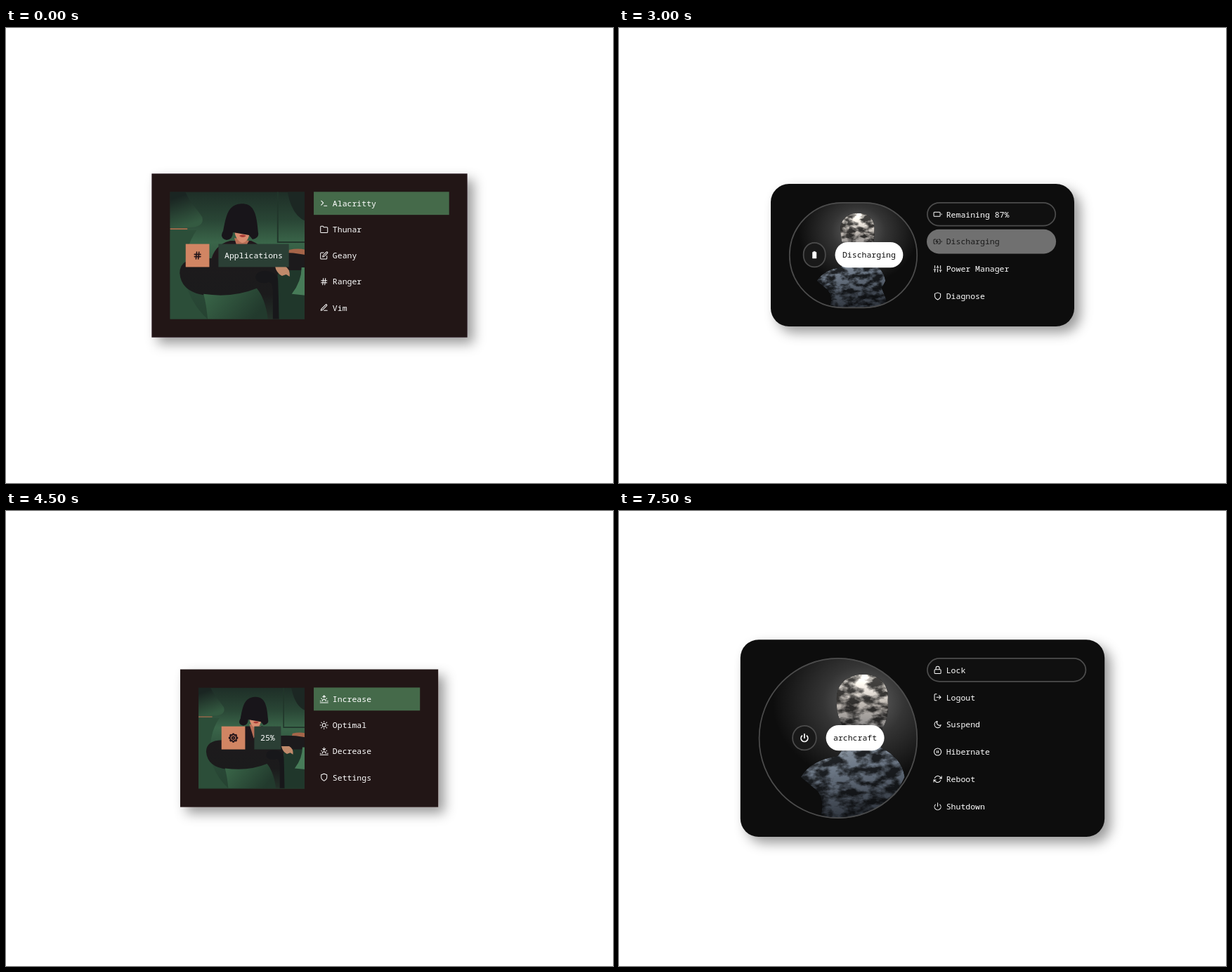
Recreate the animation shown at these times as an HTML page. Size 864x648 px, loop 8000 ms.

```html
<!DOCTYPE html>
<html lang="en">
<head>
<meta charset="utf-8">
<title>Applet menus</title>
<style>
  html, body { margin: 0; width: 100%; height: 100%; overflow: hidden; background: #fff; }
  svg { display: block; }
  #stage { width: 100vw; height: 100vh; }
  text { font: 13.333px "Noto Sans Mono", "DejaVu Sans Mono", monospace; white-space: pre; }
  .note { font-size: 11.667px; font-style: italic; }
  .icon { fill: none; stroke-width: 2; stroke-linecap: round; stroke-linejoin: round; }
</style>
</head>
<body>
<svg id="stage" viewBox="0 0 1000 750">
  <defs>
    <filter id="shadow" x="-20%" y="-30%" width="140%" height="160%">
      <feDropShadow dx="10" dy="10" stdDeviation="10" flood-color="#000" flood-opacity=".4"/>
    </filter>
    <filter id="soft2" x="-30%" y="-30%" width="160%" height="160%"><feGaussianBlur stdDeviation="1.6"/></filter>
    <filter id="soft8" x="-60%" y="-60%" width="220%" height="220%"><feGaussianBlur stdDeviation="8"/></filter>
    <filter id="stone" color-interpolation-filters="sRGB">
      <feTurbulence type="fractalNoise" baseFrequency=".05 .09" numOctaves="4" seed="4"/>
      <feColorMatrix values="0 0 0 3.4 -1.2  0 0 0 3.4 -1.2  0 0 0 3.4 -1.2  0 0 0 0 1"/>
      <feComposite in="SourceGraphic" operator="arithmetic" k1="1.2" k2=".4"/>
      <feComposite in2="SourceGraphic" operator="in"/>
    </filter>

    <linearGradient id="room" x2="0" y2="1">
      <stop offset="0" stop-color="#1e2e27"/><stop offset=".2" stop-color="#294535"/>
      <stop offset=".36" stop-color="#3a6549"/><stop offset=".6" stop-color="#2b4b39"/>
      <stop offset="1" stop-color="#24402f"/>
    </linearGradient>
    <linearGradient id="lamp" x2=".3" y2="1">
      <stop offset=".2" stop-color="#1a2522"/><stop offset="1" stop-color="#345a41"/>
    </linearGradient>
    <linearGradient id="chair" x2="0" y2="1">
      <stop offset="0" stop-color="#1d1a1c"/><stop offset=".6" stop-color="#1b1b1c"/>
      <stop offset="1" stop-color="#243129"/>
    </linearGradient>
    <linearGradient id="seat" x2="1" y2=".4">
      <stop offset="0" stop-color="#3b694a"/><stop offset="1" stop-color="#223a2d"/>
    </linearGradient>

    <linearGradient id="night" x2="0" y2="1">
      <stop offset="0" stop-color="#32256f"/><stop offset=".35" stop-color="#43248a"/>
      <stop offset=".6" stop-color="#4b2280"/><stop offset=".76" stop-color="#36195f"/>
      <stop offset="1" stop-color="#14082f"/>
    </linearGradient>
    <radialGradient id="violet"><stop stop-color="#7a34b0" stop-opacity=".75"/><stop offset="1" stop-color="#7a34b0" stop-opacity="0"/></radialGradient>
    <radialGradient id="blue"><stop stop-color="#5c6cff"/><stop offset=".45" stop-color="#4b50d8" stop-opacity=".75"/><stop offset="1" stop-color="#4b40b0" stop-opacity="0"/></radialGradient>
    <linearGradient id="wall"><stop stop-color="#7c2a80"/><stop offset=".75" stop-color="#d63f86"/><stop offset="1" stop-color="#8c2e90"/></linearGradient>
    <linearGradient id="floor" x2="0" y2="1"><stop stop-color="#451e70"/><stop offset=".35" stop-color="#2a1252"/><stop offset="1" stop-color="#12072e"/></linearGradient>

    <radialGradient id="halo"><stop stop-color="#6a6a6a"/><stop offset=".45" stop-color="#343434"/><stop offset="1" stop-color="#0d0d0d"/></radialGradient>
    <linearGradient id="skull" x2="0" y2="1"><stop stop-color="#b4b0aa"/><stop offset=".5" stop-color="#77736f"/><stop offset="1" stop-color="#4c4c4d"/></linearGradient>
    <linearGradient id="torso" x2=".2" y2="1"><stop stop-color="#6d7378"/><stop offset=".5" stop-color="#444b54"/><stop offset="1" stop-color="#20242a"/></linearGradient>

    <symbol id="lounge" viewBox="0 0 192 182" preserveAspectRatio="xMinYMin meet">
      <rect width="240" height="200" fill="url(#room)"/>
      <path d="M0 0H22C29 16 40 26 46 36Q50 50 28 51H0Z" fill="url(#lamp)"/>
      <path d="M0 53H25" stroke="#a96c4c" stroke-width="1.6"/>
      <path d="M168 0Q174 34 194 42V0Z" fill="#1c2723"/>
      <path d="M154 0V72H194" fill="none" stroke="#21362b" stroke-width="2"/>
      <path d="M0 55H38Q18 84 22 128Q30 160 54 182H0Z" fill="#2c4e39"/>
      <path d="M58 102Q62 76 86 70H116Q140 80 146 104Z" fill="#21171c"/>
      <path d="M92 66L100 92L113 70Z" fill="#b86f57"/>
      <path d="M92 56H114Q113 72 103 73Q94 70 92 56Z" fill="#d88d70"/>
      <path d="M99 63Q104 60 109 63Q104 67 99 63Z" fill="#a93c35"/>
      <path d="M102 17C122 16 124 36 126 58Q128 66 118 68L113 62L90 58Q90 68 81 69Q70 66 76 56C80 36 82 18 102 17Z" fill="#18151a"/>
      <path d="M170 83Q184 80 194 83V92H168Z" fill="#a56549"/>
      <path d="M110 94Q150 82 194 90V118H110Z" fill="#1c1a1c"/>
      <path d="M14 116Q14 96 42 95H136Q154 92 154 116V182H92Q70 150 52 148Q16 144 14 116Z" fill="url(#chair)"/>
      <path d="M48 146Q90 152 124 138Q136 152 140 182H54Q52 160 48 146Z" fill="url(#seat)"/>
      <path d="M122 122Q124 112 139 113Q155 115 156 132V182H147V140Q146 126 138 130Q124 132 122 122Z" fill="#17171a"/>
      <path d="M154 112H194V182H156Z" fill="#20372b"/>
      <path d="M174 146Q188 128 188 108H194V148Z" fill="#477b58"/>
      <path d="M150 106H164Q172 110 171 121L166 118L160 120Q152 116 150 106Z" fill="#c08a6b"/>
    </symbol>

    <symbol id="neon" viewBox="0 0 226.4 218.6" preserveAspectRatio="xMinYMin meet">
      <rect width="240" height="230" fill="url(#night)"/>
      <ellipse cx="78" cy="80" rx="88" ry="72" fill="url(#violet)"/>
      <circle cx="180" cy="74" r="66" fill="url(#blue)"/>
      <path d="M0 46L62 66V172H0Z" fill="#32165f" opacity=".75"/>
      <path d="M0 12L104 64M78 0L108 60L226 48M110 20L226 36M96 68L174 54L226 32" fill="none" stroke="#241752" stroke-width="1.3" opacity=".65"/>
      <path d="M62 118L80 124H188V166H62Z" fill="url(#wall)" opacity=".85"/>
      <ellipse cx="164" cy="142" rx="24" ry="20" fill="#ff4f8c" opacity=".6" filter="url(#soft8)"/>
      <path d="M63 120L83 124V166H63Z" fill="#a73a66"/>
      <path d="M76 122V168M88 124V166" stroke="#5f2460" stroke-width="2"/>
      <path d="M8 132H30V166H8Z" fill="#6d234f" opacity=".8"/>
      <path d="M14 128V170M24 128V170M36 112V170M48 108V170" stroke="#28103f" stroke-width="2"/>
      <g fill="none" stroke="#4a48b8" stroke-width="1.1">
        <ellipse cx="18" cy="84" rx="6" ry="18"/><ellipse cx="29" cy="87" rx="5" ry="15"/>
        <ellipse cx="37" cy="90" rx="4" ry="13"/><ellipse cx="44" cy="92" rx="3.5" ry="11"/>
        <path d="M0 56L12 78M0 100L62 118"/>
      </g>
      <rect y="166" width="240" height="60" fill="url(#floor)"/>
      <path d="M70 166H190L204 174H42Z" fill="#7b2b88" opacity=".45" filter="url(#soft2)"/>
      <circle cx="183" cy="65" r="23" fill="none" stroke="#ff45c8" stroke-width="8" opacity=".65" filter="url(#soft2)"/>
      <circle cx="183" cy="65" r="22.7" fill="none" stroke="#ffc3ee" stroke-width="3.4"/>
      <path d="M116 51H174V65H116Z" fill="#30256d" opacity=".88"/>
      <path d="M190 125Q195 126 194 132L199 136L198 154H196L195 172H191L190 158L188 172H184L183 152L181 150L182 135L187 132Q186 126 190 125Z" fill="#24104a"/>
    </symbol>

    <symbol id="statue" viewBox="0 0 226.4 229" preserveAspectRatio="xMinYMin meet">
      <rect width="300" height="240" fill="#0d0d0d"/>
      <ellipse cx="150" cy="62" rx="130" ry="115" fill="url(#halo)"/>
      <g filter="url(#stone)">
        <path d="M122 100H176L174 128Q204 142 208 170L200 186L218 229H88Q94 204 84 190L60 170Q74 146 112 140Q124 130 122 100Z" fill="url(#torso)"/>
        <path d="M147 24C168 22 186 34 184 60Q186 82 178 98Q164 110 148 110Q130 110 120 98Q110 82 111 60C110 36 128 24 147 24Z" fill="url(#skull)"/>
      </g>
    </symbol>
  </defs>
</svg>

<script>
const circle = (x, y, r) => `M${x - r} ${y}a${r} ${r} 0 1 0 ${2 * r} 0a${r} ${r} 0 1 0 ${-2 * r} 0z`;
const box = (x, y, w, h) => `M${x} ${y}h${w}v${h}h${-w}z`;

// Cog outline: each tooth has two outer and two inner corners.
function cog(teeth, inner, outer) {
  const points = Array.from({ length: teeth * 4 }, (_, i) => {
    const angle = (i - .5) / (teeth * 4) * 2 * Math.PI, r = i % 4 < 2 ? outer : inner;
    return `${(12 + r * Math.sin(angle)).toFixed(2)} ${(12 - r * Math.cos(angle)).toFixed(2)}`;
  });
  return `M${points.join('L')}z`;
}

const sunrise = 'M17 18a5 5 0 0 0-10 0M12 2v7M4.2 10.2l1.4 1.4M1 18h2M21 18h2M18.4 11.6l1.4-1.4M23 22H1';
const icons = {
  terminal: 'M4 17l6-6-6-6M12 19h8',
  folder: 'M22 19a2 2 0 0 1-2 2H4a2 2 0 0 1-2-2V5a2 2 0 0 1 2-2h5l2 3h9a2 2 0 0 1 2 2z',
  edit: 'M11 4H4a2 2 0 0 0-2 2v14a2 2 0 0 0 2 2h14a2 2 0 0 0 2-2v-7M18.5 2.5a2.12 2.12 0 0 1 3 3L12 15l-4 1 1-4z',
  hash: 'M4 9h16M4 15h16M10 3L8 21M16 3l-2 18',
  pen: 'M12 20h9M16.5 3.5a2.12 2.12 0 0 1 3 3L7 19l-4 1 1-4z',
  globe: circle(12, 12, 10) + 'M2 12h20M12 2a15.3 15.3 0 0 1 0 20a15.3 15.3 0 0 1 0-20z',
  music: 'M9 18V5l12-2v13' + circle(6, 18, 3) + circle(18, 16, 3),
  cog: cog(8, 8, 10.8) + circle(12, 12, 3),
  battery: 'M3 6h14a2 2 0 0 1 2 2v8a2 2 0 0 1-2 2H3a2 2 0 0 1-2-2V8a2 2 0 0 1 2-2zM23 13v-2',
  charging: 'M5 18H3a2 2 0 0 1-2-2V8a2 2 0 0 1 2-2h3.2M15 6h2a2 2 0 0 1 2 2v8a2 2 0 0 1-2 2h-3.2M23 13v-2M11 6l-4 6h6l-4 6',
  sliders: 'M4 21v-7M4 10V3M12 21v-9M12 8V3M20 21v-5M20 12V3M1 14h6M9 8h6M17 16h6',
  shield: 'M12 22s8-4 8-10V5l-8-3-8 3v7c0 6 8 10 8 10z',
  sunrise: sunrise + 'M8 6l4-4 4 4',
  sunset: sunrise + 'M16 5l-4 4-4-4',
  sun: circle(12, 12, 5) + 'M12 1v2M12 21v2M4.2 4.2l1.4 1.4M18.4 18.4l1.4 1.4M1 12h2M21 12h2M4.2 19.8l1.4-1.4M18.4 5.6l1.4-1.4',
  play: 'M5 3l14 9-14 9z',
  stop: box(3, 3, 18, 18),
  previous: 'M19 20L9 12l10-8zM5 19V5',
  next: 'M5 4l10 8-10 8zM19 5v14',
  repeat: 'M17 1l4 4-4 4M3 11V9a4 4 0 0 1 4-4h14M7 23l-4-4 4-4M21 13v2a4 4 0 0 1-4 4H3',
  shuffle: 'M16 3h5v5M4 20L21 3M21 16v5h-5M15 15l6 6M4 4l5 5',
  lock: 'M5 11h14a2 2 0 0 1 2 2v7a2 2 0 0 1-2 2H5a2 2 0 0 1-2-2v-7a2 2 0 0 1 2-2zM7 11V7a5 5 0 0 1 10 0v4',
  logout: 'M9 21H5a2 2 0 0 1-2-2V5a2 2 0 0 1 2-2h4M16 17l5-5-5-5M21 12H9',
  moon: 'M21 12.8A9 9 0 1 1 11.2 3 7 7 0 0 0 21 12.8z',
  pause: circle(12, 12, 10) + 'M10 15V9M14 15V9',
  refresh: 'M23 4v6h-6M1 20v-6h6M3.5 9a9 9 0 0 1 14.9-3.4L23 10M1 14l4.6 4.4A9 9 0 0 0 20.5 15',
  power: 'M18.4 6.6a9 9 0 1 1-12.8 0M12 2v10',
  grid: box(3, 4.5, 7.5, 5.5) + box(13.5, 4.5, 7.5, 5.5) + box(3, 14, 7.5, 5.5) + box(13.5, 14, 7.5, 5.5),
  cell: 'M10 3h4v2h3v16H7V5h3z',
  notes: circle(6, 18, 3) + circle(18, 16, 3) + 'M8 18V5l13-2v13h-2V9L10 11v7z',
};

const themes = {
  lounge: {
    back: '#231419', radius: 0, round: 0, rowHeight: 38, pad: 10, edge: null,
    button: '#d18563', buttonInk: '#231419', label: '#2b3f35', labelInk: '#fff',
    row: { select: ['#456a4a', '#fff'] },
  },
  neon: {
    back: '#0f0629', radius: 20, round: 15, rowHeight: 38, pad: 10, edge: null,
    button: '#8f3596', buttonInk: '#fff', label: '#6f78ff', labelInk: '#0f0629',
    row: { select: ['#e15595', '#0f0629'], active: ['#6f78ff', '#0f0629'], urgent: ['#8f3596', '#0f0629'] },
  },
  statue: {
    back: '#101010', radius: 30, round: 21, rowHeight: 40, pad: 12, edge: '#4c4c4c',
    button: '#191919', buttonInk: '#fff', label: '#fff', labelInk: '#101010',
    row: { select: ['#101010', '#fff', '#4c4c4c'], urgent: ['#707070', '#1a1a1a'] },
  },
};

// Row: icon, text, state, note
const scenes = [
  { art: 'lounge', left: 240, right: 760, top: 240, button: [296, 39, 'hash', 3], label: 'Applications', rows: [
    ['terminal', 'Alacritty', 'select'], ['folder', 'Thunar'], ['edit', 'Geany'], ['hash', 'Ranger'], ['pen', 'Vim']] },
  { art: 'neon', left: 200, right: 800, top: 218, button: [276, 38, 'grid'], label: 'Applications', rows: [
    ['terminal', 'Terminal', 'select', '(alacritty)'], ['folder', 'Files', '', '(thunar)'], ['edit', 'Editor', '', '(geany)'],
    ['globe', 'Browser', '', '(firefox)'], ['music', 'Music', '', '(alacritty -e ncmpcpp)'],
    ['cog', 'Settings', '', '(xfce4-settings-mana…']] },
  { art: 'statue', left: 250, right: 750, top: 257, button: [303, 38, 'cell'], label: 'Discharging', rows: [
    ['battery', 'Remaining 87%', 'select'], ['charging', 'Discharging', 'urgent'],
    ['sliders', 'Power Manager'], ['shield', 'Diagnose']] },
  { art: 'lounge', left: 287, right: 712, top: 261, button: [355, 39, 'cog', 3.4], label: '25%', rows: [
    ['sunrise', 'Increase', 'select'], ['sun', 'Optimal'], ['sunset', 'Decrease'], ['shield', 'Settings']] },
  { art: 'neon', left: 200, right: 800, top: 218, button: [244, 38, 'notes'], label: 'Marlowick Tensalbrook', rows: [
    ['play', 'Play', 'select'], ['stop', 'Stop'], ['previous', 'Previous'], ['next', 'Next'],
    ['repeat', 'Repeat', 'active'], ['shuffle', 'Random', 'urgent']] },
  { art: 'statue', left: 200, right: 800, top: 212, button: [285, 41, 'power', 3.2], label: 'archcraft', rows: [
    ['lock', 'Lock', 'select'], ['logout', 'Logout'], ['moon', 'Suspend'], ['pause', 'Hibernate'],
    ['refresh', 'Reboot'], ['power', 'Shutdown']] },
];

function panel(x, y, w, h, r, fill, edge, extra = '') {
  const inset = edge ? 1 : 0;
  return `<rect x="${x + inset}" y="${y + inset}" width="${w - 2 * inset}" height="${h - 2 * inset}"
    rx="${Math.min(r, w / 2, h / 2)}" fill="${fill}" ${edge ? `stroke="${edge}" stroke-width="2"` : ''} ${extra}/>`;
}

const icon = (name, x, y, size, color, weight) =>
  `<path class="icon" d="${icons[name]}" transform="translate(${x - size / 2} ${y - size / 2}) scale(${size / 24})"
    style="stroke:${color};${weight ? `stroke-width:${weight}` : `fill:${color};stroke-width:1`}"/>`;

const label = (x, y, color, text, note) =>
  `<text x="${x}" y="${y + 5}" fill="${color}">${text}${note ? ` <tspan class="note">${note}</tspan>` : ''}</text>`;

function drawScene(scene, id) {
  const { art, left, right, top, rows } = scene, theme = themes[art];
  const step = theme.rowHeight + 5, innerHeight = rows.length * step - 5;
  const imageX = left + 30, imageWidth = 492 - imageX, y0 = top + 30;
  const imageRadius = theme.edge ? 200 : theme.radius;

  const list = rows.map(([name, text, state, note], i) => {
    const y = y0 + i * step, middle = y + theme.rowHeight / 2;
    const [fill, ink, edge] = theme.row[state] || ['none', '#fff'];
    return panel(507, y, right - 30 - 507, theme.rowHeight, theme.round, fill, edge)
      + icon(name, theme.edge ? 525 : 524, middle, 14, ink, 2)
      + label(theme.edge ? 539 : 538, middle, ink, text, note);
  }).join('');

  const [buttonX, buttonWidth, buttonIcon, weight] = scene.button;
  const chipHeight = theme.edge ? 42 : 38, middle = Math.floor(top + 30 + innerHeight / 2);
  const chipY = middle - chipHeight / 2, labelX = buttonX + buttonWidth + 15;
  const labelWidth = scene.label.length * 8 + 2 * theme.pad;

  return `<g visibility="hidden">
    ${panel(left, top, right - left, innerHeight + 60, theme.radius, theme.back, null, 'filter="url(#shadow)"')}
    <clipPath id="clip${id}">${panel(imageX, y0, imageWidth, innerHeight, imageRadius, '#000')}</clipPath>
    <g clip-path="url(#clip${id})"><use href="#${art}" x="${imageX}" y="${y0}" width="${imageWidth}" height="${innerHeight}"/></g>
    ${theme.edge ? panel(imageX, y0, imageWidth, innerHeight, imageRadius, 'none', theme.edge) : ''}
    ${panel(buttonX, chipY, buttonWidth, chipHeight, theme.round, theme.button, theme.edge)}
    ${icon(buttonIcon, buttonX + buttonWidth / 2, middle, 15, theme.buttonInk, weight)}
    ${panel(labelX, chipY, labelWidth, chipHeight, theme.round, theme.label)}
    ${label(labelX + theme.pad, middle, theme.labelInk, scene.label)}
    ${list}
  </g>`;
}

const stage = document.getElementById('stage');
stage.insertAdjacentHTML('beforeend', scenes.map(drawScene).join(''));
const groups = [...stage.children].filter(node => node.tagName === 'g');

const start = performance.now();
function render(now) {
  const current = Math.floor(Math.max(0, now - start) % 8000 / 1500);
  groups.forEach((group, i) => group.setAttribute('visibility', i === current ? 'visible' : 'hidden'));
  requestAnimationFrame(render);
}
render(start);
</script>
</body>
</html>
```
